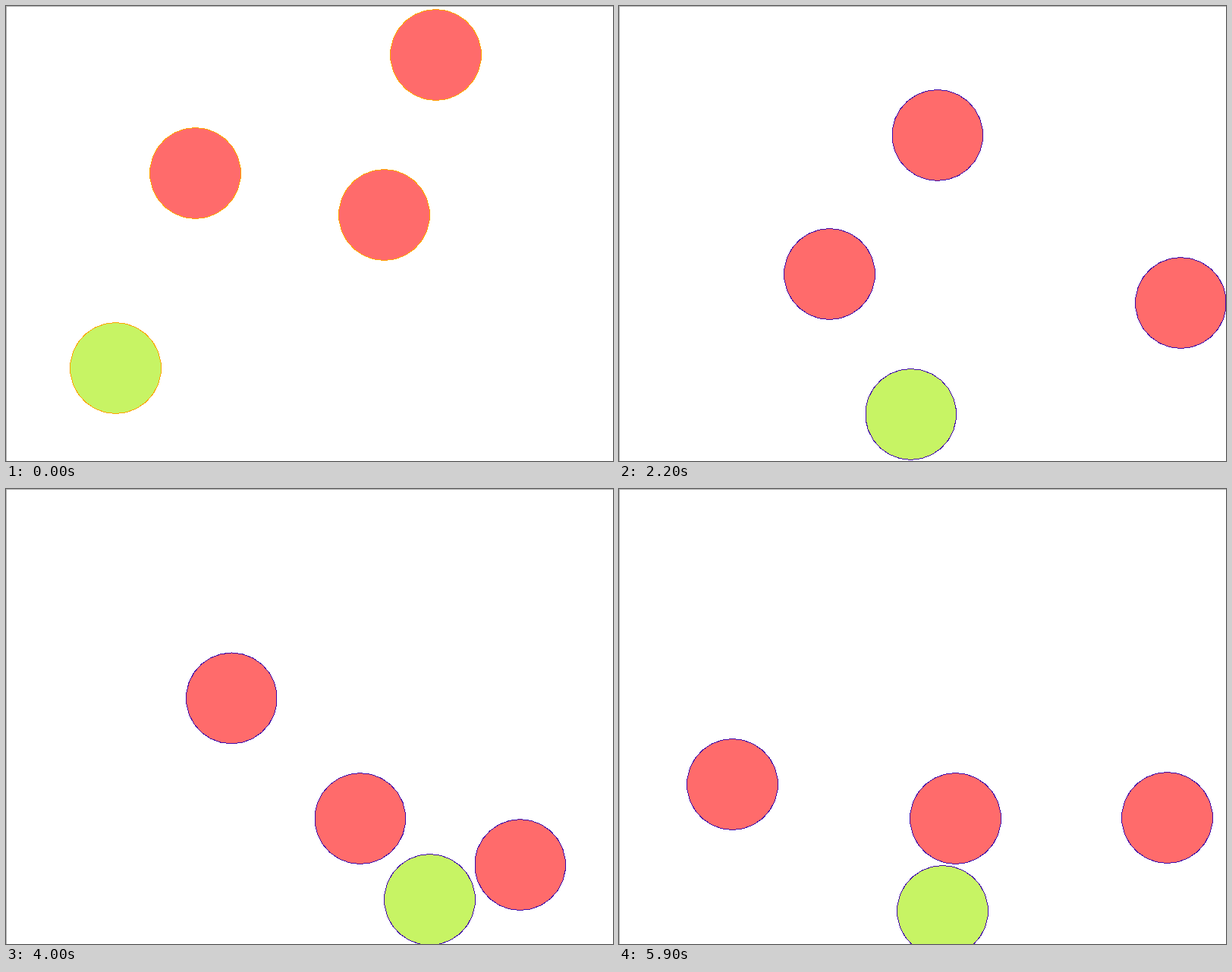
An HTML page that plays this animation: 800 by 600 pixels, repeating every 6000 ms.

```html
<!DOCTYPE html>
<html lang="en">
<head>
<meta charset="utf-8">
<title>Bouncing balls</title>
<style>
html, body { margin: 0; width: 100%; height: 100%; overflow: hidden; background: #fff; }
svg { display: block; width: 100vw; height: 100vh; }
</style>
</head>
<body>
<svg viewBox="0 0 800 600" shape-rendering="crispEdges">
  <rect width="800" height="600" fill="#fff"/>
  <g id="balls" transform="translate(.5 .5)" stroke-width="1"></g>
  <path d="M0 0H800V1H1V600H0Z" fill="#b0b0b0"/>
</svg>
<script>
const LOOP = 6000, STEP = 100, RADIUS = 60, SIDES = 26;
const RED = '#ff6b6b', GREEN = '#c7f464';
const group = document.getElementById('balls');

// A ball starts at a point [step, x, y] and flies in smooth legs; it bounces where a leg ends.
// Listed from back to front.
const balls = [
  { fill: RED, start: [0, 249, 220], legs: [
    [[10, 58, 281]],
    [[22, 277, 353], [34, 433, 405], [46, 476, 454], [59, 443, 434]]] },
  { fill: GREEN, start: [0, 144, 477], legs: [
    [[16.2, 313, 546]],
    [[34, 525, 525], [40, 558, 541], [46, 544, 537], [59, 426, 556]]] },
  { fill: RED, start: [0, 498, 275], legs: [
    [[20.4, 746, 382]],
    [[34, 695, 459], [47, 658, 538]],
    [[59, 722, 433]]] },
  { fill: RED, start: [0, 566, 64], legs: [
    [[1, 559, 60]],
    [[14, 470, 125], [34, 341, 240], [59, 149, 389]]] }
];

// Round body as a regular polygon with a vertex at the top
const outline = Array.from({ length: SIDES }, (_, i) => {
  const a = (i + 0.5) * 2 * Math.PI / SIDES;
  return `${RADIUS * Math.cos(a)},${RADIUS * Math.sin(a)}`;
}).join(' ');

for (const ball of balls) {
  let from = ball.start;
  ball.legs = ball.legs.map(leg => {
    const points = [from, ...leg];
    from = points[points.length - 1];
    return points;
  });
  ball.node = document.createElementNS('http://www.w3.org/2000/svg', 'polygon');
  ball.node.setAttribute('points', outline);
  ball.node.setAttribute('fill', ball.fill);
  group.append(ball.node);
}

// Speed at a point, taken from its neighbours in the same leg
function slope(points, i, axis) {
  const a = points[Math.max(i - 1, 0)];
  const b = points[Math.min(i + 1, points.length - 1)];
  return (b[axis] - a[axis]) / (b[0] - a[0]);
}

// Cubic Hermite curve through the points of a leg
function along(points, step, axis) {
  let i = 0;
  while (i < points.length - 2 && points[i + 1][0] < step) i++;
  const p = points[i], q = points[i + 1];
  const span = q[0] - p[0], s = (step - p[0]) / span, r = 1 - s;
  return p[axis] * r * r * (1 + 2 * s) + q[axis] * s * s * (1 + 2 * r)
    + span * s * r * (r * slope(points, i, axis) - s * slope(points, i + 1, axis));
}

function draw(ms) {
  const step = Math.floor((ms % LOOP) / STEP);
  group.setAttribute('stroke', step ? '#4008a8' : '#ffa500');
  for (const { node, legs } of balls) {
    const leg = legs.find(points => step <= points[points.length - 1][0]);
    node.setAttribute('transform', `translate(${along(leg, step, 1)} ${along(leg, step, 2)})`);
  }
}

const start = performance.now();
function tick() {
  draw(performance.now() - start);
  requestAnimationFrame(tick);
}
tick();
</script>
</body>
</html>
```
